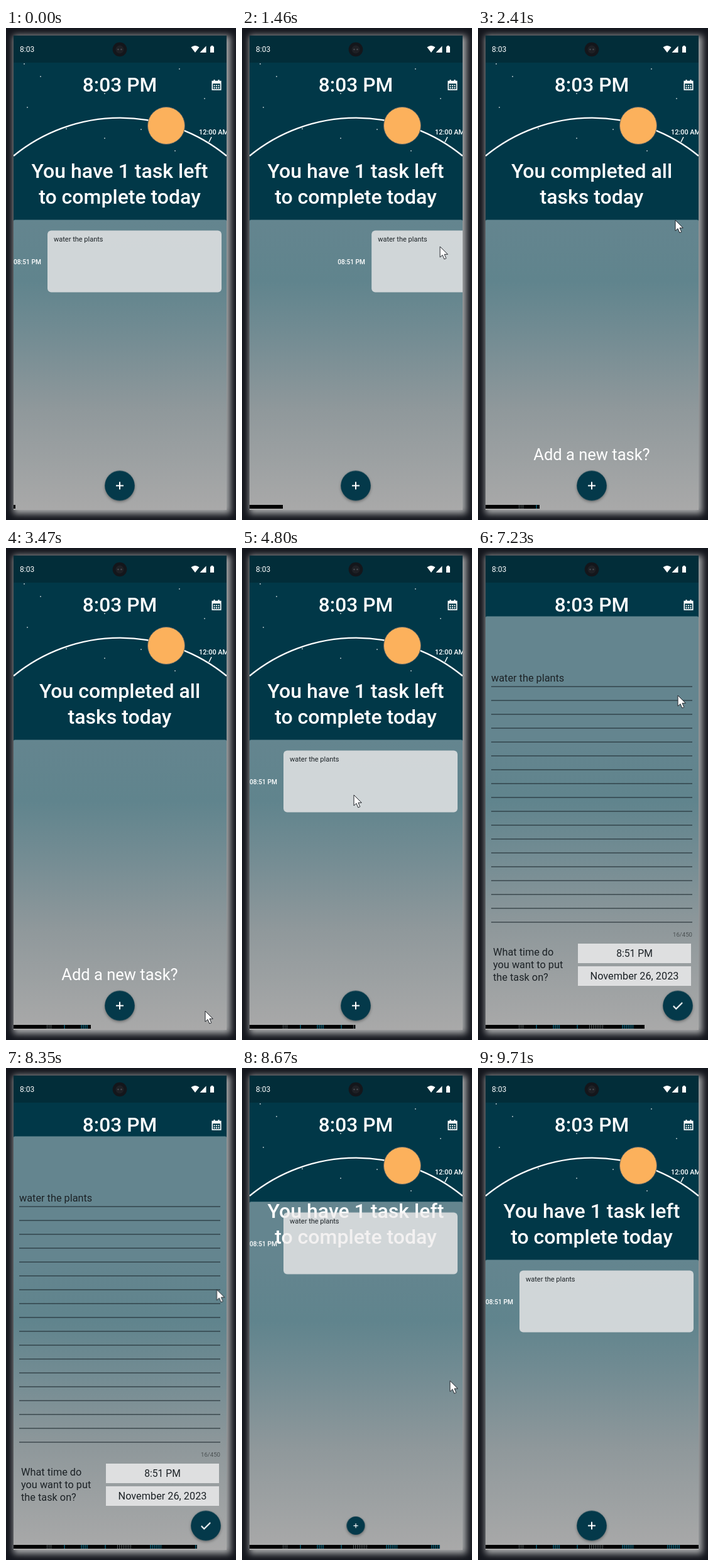
Animation, 366 px wide and 781 px high, one loop 9.78 s. Source, as an HTML page:

```html
<!DOCTYPE html>
<html lang="en">
<head>
<meta charset="utf-8">
<title>Day planner</title>
<style>
html, body { margin: 0; width: 100%; height: 100%; overflow: hidden; background: #14161d; }
.glow { position: absolute; left: 12px; top: 12px; width: 339px; height: 753px; box-shadow: 3px 3px 10px 3px #a9abac; }
svg { position: absolute; left: 0; top: 0; font-family: Roboto, sans-serif; fill: #fff; }
.mid { text-anchor: middle; }
.line { fill: none; stroke: #fff; }
.ink { fill: #1c2226; }
.big { font-size: 32px; font-weight: 500; }
.tiny { font-size: 10.9px; font-weight: 500; }
.note { font-size: 11px; }
.form { font-size: 16.3px; }

svg [class*="a-"], .bar { animation: 9.78s linear infinite; }

svg .a-panel { animation-name: panel; }
@keyframes panel {
  0%, 66.46% { y: 304.5px; animation-timing-function: ease-in-out; }
  71.57%, 86.01% { y: 108.5px; animation-timing-function: cubic-bezier(.37,0,.63,1); }
  91.12%, 100% { y: 304.5px; }
}
svg .a-list { animation-name: list; }
@keyframes list {
  0%, 66.46% { transform: none; opacity: 1; animation-timing-function: ease-in-out; }
  71.57%, 86.01% { transform: translateY(-196px); opacity: 0; animation-timing-function: cubic-bezier(.37,0,.63,1); }
  88% { opacity: 1; }
  91.12%, 100% { transform: none; opacity: 1; }
}
svg .a-home { animation-name: home; }
@keyframes home {
  0%, 66.46% { opacity: 1; }
  69%, 86.01% { opacity: 0; }
  88.6%, 100% { opacity: 1; }
}
svg .a-edit { animation-name: edit; }
@keyframes edit {
  0%, 68.5% { opacity: 0; }
  71.57%, 86.01% { opacity: 1; }
  87.6%, 100% { opacity: 0; }
}
svg .a-swipe { animation-name: swipe; }
@keyframes swipe {
  0%, 11.35% { transform: none; }
  14.93% { transform: translateX(140px); }
  16.56% { transform: translateX(175px); }
  18.6%, 37.83% { transform: translateX(345px); animation-timing-function: ease-out; }
  42.94%, 100% { transform: none; }
}
svg .a-todo { animation-name: todo; }
@keyframes todo {
  0%, 21.46% { opacity: 1; }
  21.47%, 37.31% { opacity: 0; }
  37.32%, 100% { opacity: 1; }
}
svg .a-done { animation-name: done; }
@keyframes done {
  0%, 21.46% { opacity: 0; }
  21.47%, 37.31% { opacity: 1; }
  37.32%, 100% { opacity: 0; }
}
svg .a-idle { animation-name: idle; }
@keyframes idle {
  0%, 55.72% { opacity: 1; }
  55.73%, 66.45% { opacity: 0; }
  66.46%, 100% { opacity: 1; }
}
svg .a-picked { animation-name: picked; }
@keyframes picked {
  0%, 55.72% { opacity: 0; }
  55.73%, 66.45% { opacity: 1; }
  66.46%, 100% { opacity: 0; }
}
svg .a-ripple { animation-name: ripple; }
@keyframes ripple {
  0%, 62.2% { transform: scale(0); }
  63.7%, 100% { transform: none; }
}
svg .a-add { animation-name: add; }
@keyframes add {
  0%, 66.46% { transform: none; animation-timing-function: ease-in; }
  68.5%, 88.14% { transform: scale(0); animation-timing-function: cubic-bezier(.215,.61,.355,1); }
  90.18%, 100% { transform: none; }
}
svg .a-save { animation-name: save; }
@keyframes save {
  0%, 68.5% { transform: scale(0); animation-timing-function: ease-out; }
  70.5%, 86.07% { transform: none; animation-timing-function: ease-in; }
  88.1%, 100% { transform: scale(0); }
}
svg .a-cursor { animation-name: cursor; animation-timing-function: ease-in-out; }
@keyframes cursor {
  0%, 2% { transform: translate(300px, 790px); }
  9.2%, 11.35% { transform: translate(166px, 373px); animation-timing-function: linear; }
  14.93% { transform: translate(315px, 347px); animation-timing-function: linear; }
  16.56% { transform: translate(335px, 325px); }
  19.4%, 25.6% { transform: translate(314px, 305px); }
  32.7%, 39.9% { transform: translate(317px, 735px); }
  49.1%, 56.2% { transform: translate(178px, 392px); }
  62.4%, 68% { transform: translate(295px, 88px); }
  73.9% { transform: translate(318px, 234px); }
  76.7% { transform: translate(330px, 142px); }
  80.8% { transform: translate(336px, 200px); animation-timing-function: ease-in; }
  84.9% { transform: translate(336px, 330px); animation-timing-function: linear; }
  88.65% { transform: translate(331px, 496px); animation-timing-function: linear; }
  93.6% { transform: translate(303px, 738px); }
  95.1%, 100% { transform: translate(302px, 790px); }
}

.bar {
  position: absolute; left: 12px; top: 757px; height: 6px;
  --grey: repeating-linear-gradient(90deg, #000 0 2px, #5d6668 2px 3px);
  --teal: repeating-linear-gradient(90deg, #000 0 1px, #0b4a5c 1px 3px);
  background:
    var(--grey) 51px 0 / 9px 6px no-repeat,
    var(--teal) 79px 0 / 4px 6px no-repeat,
    var(--teal) 106px 0 / 12px 6px no-repeat,
    var(--teal) 144px 0 / 4px 6px no-repeat,
    var(--grey) 163px 0 / 25px 6px no-repeat,
    var(--teal) 216px 0 / 20px 6px no-repeat,
    var(--teal) 288px 0 / 22px 6px no-repeat,
    #000;
  animation-name: bar;
}
@keyframes bar { from { width: 3px; } to { width: 341px; } }
</style>
</head>
<body>
<div class="glow"></div>
<svg width="366" height="781" viewBox="0 0 366 781">
  <defs>
    <clipPath id="screen"><rect x="12" y="12" width="339" height="753"/></clipPath>
    <linearGradient id="dusk" gradientUnits="userSpaceOnUse" x1="0" y1="305" x2="0" y2="765">
      <stop offset="0" stop-color="#64858f"/>
      <stop offset=".21" stop-color="#60848d"/>
      <stop offset=".4" stop-color="#738c93"/>
      <stop offset=".65" stop-color="#8f989b"/>
      <stop offset="1" stop-color="#a9a9a9"/>
    </linearGradient>
  </defs>
  <g clip-path="url(#screen)">
    <rect x="12" y="12" width="339" height="753" fill="#013848"/>
    <g class="a-home"><g id="stars" opacity=".75"></g></g>
    <path class="line" stroke-width="2.3" d="M12 203A268 268 0 0 1 351 203"/>
    <circle cx="255" cy="155" r="29.5" fill="#fcb15c" stroke="#5c6465"/>
    <path class="line" stroke-width="1.6" d="M327 173l-4 8"/>
    <text class="tiny" x="307" y="168.5">12:00 AM</text>

    <rect class="a-panel" x="12" y="304.5" width="339" height="660" rx="2" fill="url(#dusk)"/>

    <g class="a-home">
      <g class="a-todo mid big">
        <text x="181" y="238">You have 1 task left</text>
        <text x="181" y="279">to complete today</text>
      </g>
      <g class="a-done mid big">
        <text x="181" y="238">You completed all</text>
        <text x="181" y="279">tasks today</text>
        <text x="181" y="685.5" font-size="25.5" font-weight="400">Add a new task?</text>
      </g>
    </g>

    <g class="a-list"><g class="a-swipe">
      <text x="12" y="374.5" font-size="10.2" font-weight="500">08:51 PM</text>
      <g class="a-idle">
        <rect x="66" y="321.5" width="277" height="98" rx="6" fill="#f0eeee" fill-opacity=".78"/>
        <text class="note ink" x="76" y="338.5">water the plants</text>
      </g>
      <g class="a-picked">
        <rect x="67.5" y="323" width="273.5" height="95" rx="5" fill="#bac1c3" stroke="#464a4d" stroke-width="2.4"/>
        <text class="note ink" x="78" y="341">water the plants</text>
      </g>
    </g></g>

    <g class="a-edit form">
      <text class="ink" x="21" y="212">water the plants</text>
      <g id="rules" stroke="#1d292e" stroke-opacity=".7" stroke-width="1.5"></g>
      <text x="341" y="616.5" text-anchor="end" font-size="9.6" fill="#4a5052">16/450</text>
      <g class="ink">
        <text x="24" y="647">What time do</text>
        <text x="24" y="667">you want to put</text>
        <text x="24" y="687">the task on?</text>
      </g>
      <g fill="#dedfe0">
        <rect x="159" y="628" width="180" height="31"/>
        <rect x="159" y="664" width="180" height="31"/>
      </g>
      <g class="ink mid">
        <text x="249" y="648.5" font-size="15.7">8:51 PM</text>
        <text x="249" y="684.5">November 26, 2023</text>
      </g>
    </g>

    <rect x="12" y="12" width="339" height="43" fill="#022d39"/>
    <text x="22" y="38" font-size="12">8:03</text>
    <circle cx="181" cy="34" r="11.3" fill="#14161b"/>
    <circle cx="181" cy="34" r="6.5" fill="#1e2025"/>
    <g fill="#44474c"><circle cx="178.5" cy="34" r="1.3"/><circle cx="183.5" cy="34" r="1.3"/></g>
    <path d="M294.5 30.5Q301 25.5 307.5 30.5L301 39zM308.5 39L318.5 28.5V39zM325 29.5h1.5V28h3v1.5h1.5V39h-6z"/>

    <g class="a-idle">
      <text class="mid" x="181" y="101" font-size="31.7" font-weight="500">8:03 PM</text>
      <path class="line" stroke-width="1.7" d="M328.3 84.5h13.4v13.4h-13.4z"/>
      <path d="M328 84h14v4.2h-14zM330.5 82h2v3h-2zM337.5 82h2v3h-2z"/>
      <path class="line" stroke-width="2" stroke-dasharray="2 1.4" d="M330.6 91.5h9M330.6 95h9"/>
    </g>
    <g class="a-picked">
      <text x="21" y="100.5" font-size="32.7" font-weight="500">water the plants</text>
      <g transform="translate(294 90)"><circle class="a-ripple" r="30" fill-opacity=".14"/></g>
      <path transform="translate(284 80.5) scale(.83)" d="M3 17.25V21h3.75L17.8 9.9l-3.7-3.7zM20.7 7c.4-.4.4-1 0-1.4L18.4 3.300c-.4-.4-1-.4-1.400 0l-1.900 1.800 3.800 3.800z"/>
      <path transform="translate(325 80) scale(.83)" d="M6 19c0 1.1.9 2 2 2h8c1.1 0 2-.9 2-2V7H6zM19 4h-3.5l-1-1h-5l-1 1H5v2h14z"/>
    </g>

    <g style="filter: drop-shadow(0 2px 2px rgba(0,0,0,.35))">
      <g transform="translate(181 726.5)"><g class="a-add">
        <circle r="23.8" fill="#04394a"/>
        <path class="line" stroke-width="2" d="M-6 0H6M0-6V6"/>
      </g></g>
      <g transform="translate(318 726.5)"><g class="a-save">
        <circle r="23.8" fill="#04394a"/>
        <path class="line" stroke-width="2" d="M-7.2 .5L-2.7 5 7.2-4.8"/>
      </g></g>
    </g>

    <path class="a-cursor" stroke="#20242a" d="M0 0V17L4 13.4 6.8 20 9.8 18.7 7 12.3H12.3z"/>
  </g>
</svg>
<div class="bar"></div>
<script>
const NS = "http://www.w3.org/2000/svg";
const add = (id, tag, attrs) => {
  const el = document.createElementNS(NS, tag);
  for (const key in attrs) el.setAttribute(key, attrs[key]);
  document.getElementById(id).append(el);
};
const stars = [[29, 57], [55, 77], [34, 126], [276, 65], [316, 112], [96, 160], [157, 175], [215, 161], [269, 195], [157, 104]];
for (const [cx, cy] of stars) add("stars", "circle", { cx, cy, r: 0.9 });
for (let y = 220; y <= 594; y += 22) add("rules", "line", { x1: 21, x2: 341, y1: y, y2: y });
</script>
</body>
</html>
```
